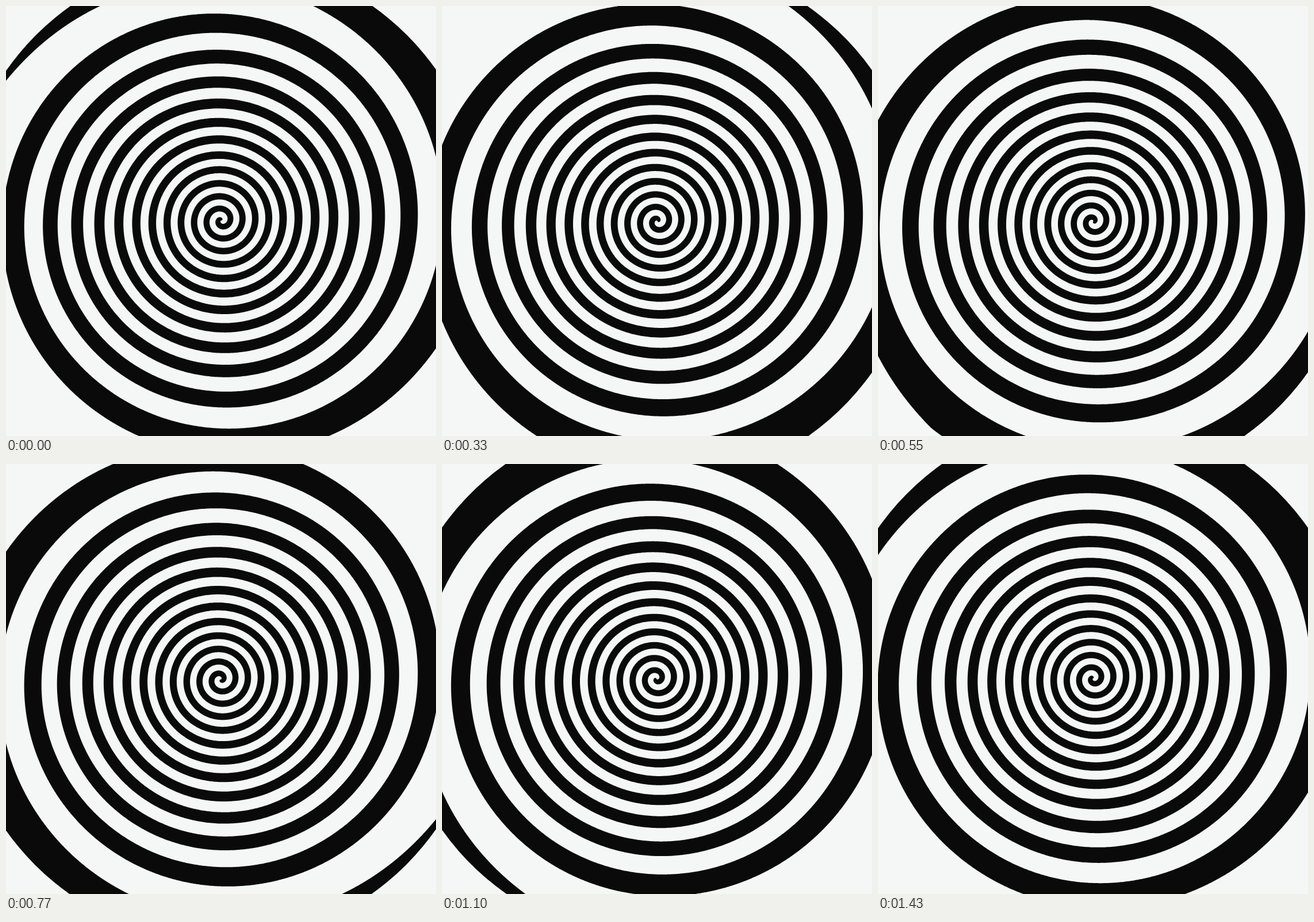
These frames come from a looping animation (748 by 748 pixels, 1540 ms). An HTML page with a canvas:

```html
<!DOCTYPE html>
<html lang="en">
<head>
<meta charset="utf-8">
<title>Spiral</title>
<style>
  html, body { margin: 0; width: 748px; height: 748px; overflow: hidden; background: #f5f7f6; }
  canvas { display: block; }
</style>
</head>
<body>
<canvas id="stage" width="748" height="748"></canvas>
<script>
const SIZE = 748, STEP_MS = 110, STEPS = 14, TAU = Math.PI * 2;
const TURNS = 12, REACH = 481, DISC = 456.3, PINCH = 0.033;
const OFF_AXIS = { x: 0.8, y: -0.9 };
const ctx = document.getElementById('stage').getContext('2d');

// One edge of the dark band; side is 1 for the inner edge, -1 for the outer.
// The winding slows quadratically outwards and the band narrows near the rim.
// Angles are in turns, counterclockwise from straight up.
function addEdgePoint(path, radius, side) {
  const halfWidth = 0.25 - PINCH * (radius / DISC) ** 4;
  const turn = side * halfWidth - TURNS * (1 - radius / REACH) ** 2;
  path.lineTo(-radius * Math.sin(turn * TAU), -radius * Math.cos(turn * TAU));
  return turn;
}

function makeSpiral() {
  const path = new Path2D(), n = 6000;
  path.moveTo(0, 0);
  let turn;
  for (let i = 0; i <= n; i++) turn = addEdgePoint(path, REACH * i / n, 1);
  const canvasAngle = t => -(t + 0.25) * TAU;
  path.arc(0, 0, REACH, canvasAngle(turn), canvasAngle(-turn));
  for (let i = n; i >= 0; i--) addEdgePoint(path, REACH * i / n, -1);
  path.closePath();
  return path;
}

const spiral = makeSpiral();
let shown = -1;

function draw(step) {
  ctx.fillStyle = '#f5f7f6';
  ctx.fillRect(0, 0, SIZE, SIZE);
  ctx.save();
  ctx.translate(SIZE / 2, SIZE / 2);
  ctx.rotate(TAU * step / STEPS);
  ctx.translate(OFF_AXIS.x, OFF_AXIS.y);
  ctx.beginPath();
  ctx.arc(0, 0, DISC, 0, TAU);
  ctx.clip();
  ctx.fillStyle = '#0a0a0a';
  ctx.fill(spiral);
  ctx.restore();
}

function tick() {
  const step = Math.floor(performance.now() / STEP_MS) % STEPS;
  if (step !== shown) draw(shown = step);
  requestAnimationFrame(tick);
}
tick();
</script>
</body>
</html>
```
